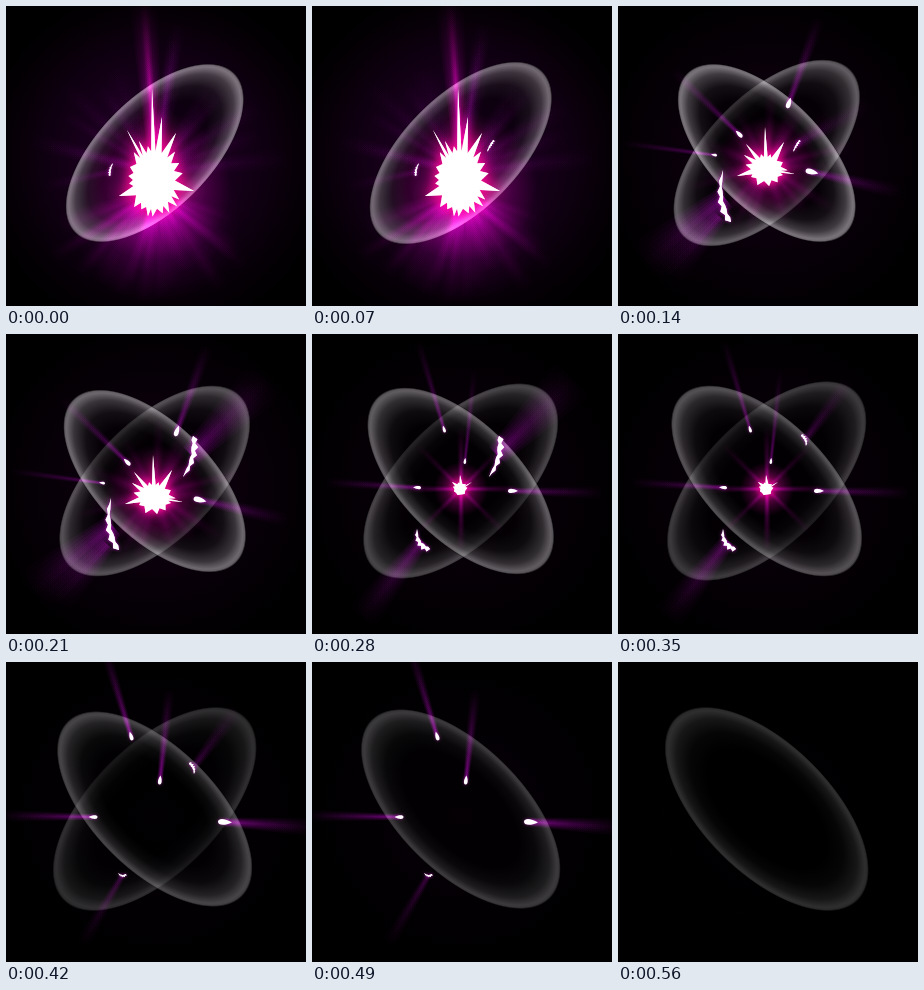
An HTML page with a canvas for the animation above (630 ms loop, 300 by 300 pixels).

```html
<!DOCTYPE html>
<html lang="en">
<head>
<meta charset="utf-8">
<title>Energy burst</title>
<style>
html, body { margin: 0; width: 100%; height: 100%; overflow: hidden; background: #000; }
canvas { display: block; width: 300px; height: 300px; }
</style>
</head>
<body>
<canvas id="stage" width="300" height="300"></canvas>
<script>
const ctx = document.getElementById('stage').getContext('2d');
const STEP = 70, STEPS = 9, LIGHT = { x: 150, y: 156 };
const PURPLE = '135,5,145', MAGENTA = '205,0,150';

// Jagged bodies with their long spikes
const cores = [
  { x: 148, y: 174, rx: 21, ry: 29, teeth: 22, seed: 5, halo: 13,
    spikes: [[121, 124], [133, 135], [146, 82], [156, 111], [170, 127], [188, 185], [113, 190]] },
  { x: 148, y: 163, rx: 15, ry: 12, teeth: 13, seed: 9, halo: 9,
    spikes: [[119, 170], [126, 149], [128, 138], [147, 121], [166, 136], [177, 168]] },
  { x: 148, y: 155, rx: 5.5, ry: 5.5, teeth: 7, seed: 4, halo: 9,
    spikes: [[140, 148], [148, 141], [160, 148]] }
];

// Spine from thin tail to thick head: start, control, end, width
const lowerShards = [
  [107, 157, 103, 164, 104, 170, 3],
  [105, 164, 98, 196, 113, 216, 8],
  [105, 195, 104, 212, 118, 215, 7],
  [112, 211, 117, 216, 120, 212, 3]
];
const upperShards = [
  null,
  [175, 146, 178, 139, 182, 134, 3],
  [177, 143, 191, 122, 187, 102, 8],
  [188, 112, 189, 105, 183, 101, 4]
];

// x, y, length
const darts = [
  [],
  [[171, 97, 11], [121, 128, 9], [96, 149, 6], [194, 166, 13]],
  [[132, 95, 7], [153, 127, 6], [105, 153.5, 8], [201, 157, 10]],
  [[125, 74, 9], [154, 118, 9], [87, 155, 9], [219, 160, 14]]
];

const glowLevel = [0.2, 0.09, 0.055, 0.03, 0.008];

function randomizer(seed) {
  return () => (seed = (seed * 16807) % 2147483647) / 2147483647;
}

function glow(x, y, r, rgb, alpha) {
  const g = ctx.createRadialGradient(x, y, 0, x, y, r);
  g.addColorStop(0, `rgba(${rgb},${alpha})`);
  g.addColorStop(0.45, `rgba(${rgb},${alpha * 0.5})`);
  g.addColorStop(1, `rgba(${rgb},0)`);
  ctx.fillStyle = g;
  ctx.fillRect(x - r, y - r, 2 * r, 2 * r);
}

// Soft beam leaving (x, y) at an angle, widening and fading
function beam(x, y, angle, length, width, rgb, alpha) {
  ctx.save();
  ctx.translate(x, y);
  ctx.rotate(angle);
  const g = ctx.createLinearGradient(0, 0, length, 0);
  g.addColorStop(0, `rgba(${rgb},${alpha / 5})`);
  g.addColorStop(0.35, `rgba(${rgb},${alpha / 9})`);
  g.addColorStop(1, `rgba(${rgb},0)`);
  ctx.fillStyle = g;
  for (let i = 1; i <= 5; i++) {
    const w = width * i / 6;
    ctx.beginPath();
    ctx.moveTo(0, -w);
    ctx.lineTo(length, -w * 2.2);
    ctx.lineTo(length, w * 2.2);
    ctx.lineTo(0, w);
    ctx.fill();
  }
  ctx.restore();
}

function angleFromLight(x, y) {
  return Math.atan2(y - LIGHT.y, x - LIGHT.x);
}

function castBeam(x, y, length, width, alpha) {
  beam(x, y, angleFromLight(x, y), length, width, PURPLE, alpha);
}

function ring(age, tilt) {
  if (age < 0 || age > 6) return;
  const a = 113 + 2.72 * age;
  const peak = 0.46 * (1 - age / 10);
  ctx.save();
  ctx.translate(148.7, 147);
  ctx.rotate(tilt);
  ctx.scale(a, a / 2);
  ctx.beginPath();
  ctx.arc(0, 0, 1, 0, 7);
  ctx.fillStyle = 'rgba(0,0,0,0.5)';
  ctx.fill();
  const g = ctx.createRadialGradient(0, 0, 0.58, 0, 0, 1);
  [[0, 0], [0.4, 0.13], [0.72, 0.5], [0.91, 1], [0.96, 0.9], [1, 0]].forEach(([at, level]) =>
    g.addColorStop(at, `rgba(255,250,255,${peak * level})`));
  ctx.globalCompositeOperation = 'lighter';
  ctx.fillStyle = g;
  ctx.fill();
  ctx.restore();
}

function fillWhite(points, halo, blur) {
  ctx.save();
  ctx.beginPath();
  points.forEach(([x, y]) => ctx.lineTo(x, y));
  ctx.closePath();
  ctx.fillStyle = '#fff';
  ctx.shadowColor = halo;
  ctx.shadowBlur = blur;
  ctx.fill();
  ctx.fill();
  ctx.restore();
}

function core({ x, y, rx, ry, teeth, seed, halo, spikes }) {
  const rnd = randomizer(seed * 7919);
  const tips = spikes.map(([sx, sy]) => {
    const u = (sx - x) / rx, v = (sy - y) / ry;
    return { angle: Math.atan2(v, u), r: Math.hypot(u, v) };
  });
  const long = tips.slice();
  for (let i = 0; i < teeth; i++) {
    const angle = -Math.PI + 2 * Math.PI * (i + 0.2 + 0.6 * rnd()) / teeth;
    const r = 1.15 + 0.3 * rnd();
    if (long.every(t => Math.abs(t.angle - angle) > 0.13)) tips.push({ angle, r });
  }
  tips.sort((a, b) => a.angle - b.angle);
  const at = (angle, r) => [x + rx * r * Math.cos(angle), y + ry * r * Math.sin(angle)];
  const outline = [];
  tips.forEach((tip, i) => {
    const next = i + 1 < tips.length ? tips[i + 1].angle : tips[0].angle + 2 * Math.PI;
    outline.push(at(tip.angle, tip.r), at((tip.angle + next) / 2, 1));
  });
  fillWhite(outline, '#f5088f', halo);
}

// Curved splinter with one ragged side
function shard(spine) {
  if (!spine) return;
  const [x0, y0, cx, cy, x1, y1, width] = spine;
  const ragged = [], smooth = [], n = 11;
  for (let i = 0; i <= n; i++) {
    const t = i / n, s = 1 - t;
    const x = s * s * x0 + 2 * s * t * cx + t * t * x1;
    const y = s * s * y0 + 2 * s * t * cy + t * t * y1;
    const dx = s * (cx - x0) + t * (x1 - cx), dy = s * (cy - y0) + t * (y1 - cy);
    const w = width * Math.pow(t, 0.7) * Math.pow(s, 0.25) / Math.hypot(dx, dy);
    const out = w * (i % 2 ? 0.3 : 0.95), inn = w * (i % 3 ? 0.5 : 0.25);
    ragged.push([x - dy * out, y + dx * out]);
    smooth.unshift([x + dy * inn, y - dx * inn]);
  }
  fillWhite(ragged.concat(smooth), 'rgba(190,30,190,0.6)', 3);
}

function dart([x, y, length]) {
  const half = length / 2, w = length * 0.28;
  ctx.save();
  ctx.translate(x, y);
  ctx.rotate(angleFromLight(x, y));
  ctx.beginPath();
  ctx.moveTo(half, 0);
  ctx.bezierCurveTo(0, -w, -half, -w, -half, 0);
  ctx.bezierCurveTo(-half, w, 0, w, half, 0);
  ctx.fillStyle = '#fff';
  ctx.shadowColor = 'rgba(190,30,190,0.7)';
  ctx.shadowBlur = 3;
  ctx.fill();
  ctx.restore();
}

function blastBeams() {
  const rnd = randomizer(23);
  for (let i = 0; i < 22; i++) {
    const angle = 0.35 + 2.45 * (i + rnd()) / 22;
    beam(150, 186, angle, 80 + 50 * rnd(), 3 + 4 * rnd(), '165,0,150', 0.25 + 0.25 * rnd());
  }
  for (let i = 0; i < 14; i++) {
    const angle = Math.PI + Math.PI * (i + rnd()) / 14;
    beam(149, 165, angle, 95 + 45 * rnd(), 3 + 4 * rnd(), PURPLE, 0.15 + 0.2 * rnd());
  }
  const up = -Math.PI / 2;
  beam(149, 152, up - 0.075, 160, 8, '180,0,155', 0.8);
  beam(148, 135, up - 0.07, 138, 3, MAGENTA, 0.55);
  beam(152, 135, up + 0.17, 120, 5, PURPLE, 0.45);
  glow(150, 180, 75, '175,0,130', 0.55);
  glow(150, 212, 85, '120,0,115', 0.35);
}

function coreBeams(pose) {
  if (pose === 1) {
    const rnd = randomizer(71);
    for (let i = 0; i < 17; i++) {
      beam(149, 160, Math.PI * 2 * (i + rnd()) / 17, 55 + 35 * rnd(), 3 + 2 * rnd(), '165,0,140', 0.3);
    }
    glow(150, 163, 52, '185,0,140', 0.65);
  } else if (pose === 2) {
    for (let i = 0; i < 8; i++) beam(149, 155, i * Math.PI / 4, 62, 2.5, '185,0,165', i % 2 ? 0.35 : 0.6);
    glow(149, 155, 27, MAGENTA, 0.7);
  }
}

function shardBeams(pose, upper) {
  if (pose === 0) castBeam(104, 166, 70, 4, 0.2);
  if (pose === 1) {
    castBeam(107, 192, 105, 14, 0.65);
    castBeam(102, 211, 78, 9, 0.4);
  }
  if (pose === 2) castBeam(110, 207, 100, 9, 0.55);
  if (pose === 3) castBeam(116, 214, 80, 4, 0.4);
  if (upper === 1 && pose > 0) castBeam(179, 139, 85, 6, 0.3);
  if (upper === 2) castBeam(185, 121, 110, 13, 0.6);
  if (upper === 3) castBeam(187, 106, 75, 5, 0.4);
}

function draw(step) {
  const pose = step >> 1, upper = (step + 1) >> 1;
  const flying = darts[pose] || [];
  ctx.globalCompositeOperation = 'source-over';
  ctx.fillStyle = '#000';
  ctx.fillRect(0, 0, 300, 300);
  glow(150, 155, 180, '150,0,165', glowLevel[pose]);
  glow(150, 150, 150, '90,0,110', glowLevel[pose]);

  ring(step, -Math.PI / 4);
  ring(step - 2, Math.PI / 4);

  ctx.globalCompositeOperation = 'lighter';
  if (pose === 0) blastBeams();
  coreBeams(pose);
  shardBeams(pose, upper);
  flying.forEach(([x, y, length]) => castBeam(x, y, 92, length * 0.36, pose === 3 ? 0.85 : 0.65));

  ctx.globalCompositeOperation = 'source-over';
  if (cores[pose]) core(cores[pose]);
  shard(lowerShards[pose]);
  shard(upperShards[upper]);
  flying.forEach(dart);
}

function tick() {
  draw(Math.floor(performance.now() / STEP) % STEPS);
  requestAnimationFrame(tick);
}
tick();
</script>
</body>
</html>
```
